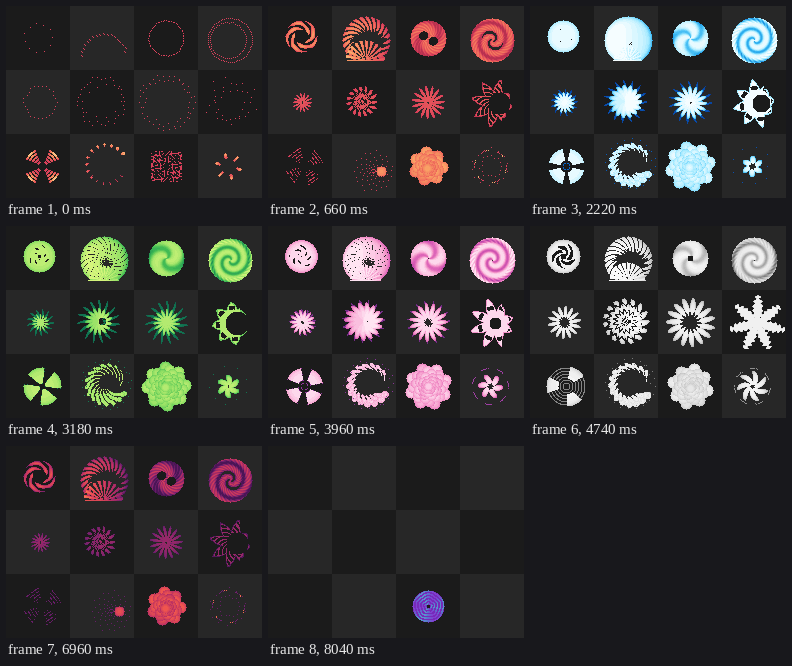
An HTML page with a canvas that plays this animation: 256x192 px, repeating every 8100 ms.

```html
<!DOCTYPE html>
<html lang="en">
<head>
<meta charset="utf-8">
<title>Magic bursts</title>
<style>
html, body { margin: 0; width: 100%; height: 100%; overflow: hidden; background: #1b1b1b; }
canvas { display: block; width: 256px; height: 192px; image-rendering: pixelated; }
</style>
</head>
<body>
<canvas id="stage" width="256" height="192"></canvas>
<script>
const g = document.getElementById('stage').getContext('2d');
const { PI, cos, sin, abs, acos, floor, hypot, atan2, min, max, round } = Math;
const TAU = PI * 2, STEP = 60, LIFE = 15, LEVELS = 24;

// Blend five stops, dark to light, into a smooth ramp
function ramp(stops) {
  const rgb = stops.split(' ').map(s => [1, 3, 5].map(i => parseInt(s.slice(i, i + 2), 16)));
  return Array.from({ length: LEVELS + 1 }, (_, n) => {
    const p = n / LEVELS * 4, i = min(3, floor(p));
    return `rgb(${rgb[i].map((c, j) => round(c + (rgb[i + 1][j] - c) * (p - i)))})`;
  });
}

const palettes = [
  '#a82a4a #d8405a #ee665a #f9a065 #ffe0a4',
  '#7a3018 #c45a20 #f09030 #ffc850 #fff3b0',
  '#08257c #0866c8 #35b5f2 #a5eaff #f5fdff',
  '#0b5048 #148454 #42bb54 #91df64 #d5f57c',
  '#54206c #9438a0 #d85bb4 #f59acb #ffe4f2',
  '#555555 #858585 #b8b8b8 #dddddd #fafafa',
  '#124858 #19808b #35b9a9 #88e2bd #e2ffe0',
  '#38104a #70206d #b92f62 #ef554e #ffc06e',
  '#41167a #7526b5 #8040d0 #5972cd #58aacd'
].map(ramp);

let pal, keep;

const noise = (x, y) => {
  const n = sin(x * 12.9898 + y * 78.233) * 43758.5453;
  return n - floor(n);
};

// Linear value through the main poses of a burst
function at(k, ...v) {
  const t = [0, 4, 7, 8, 11, 14];
  let i = 0;
  while (i < 4 && k > t[i + 1]) i++;
  return v[i] + (v[i + 1] - v[i]) * (k - t[i]) / (t[i + 1] - t[i]);
}

function plot(x, y, v) {
  x = round(x); y = round(y);
  if (v <= 0 || noise(x, y) > keep) return;
  g.fillStyle = pal[round(min(1, v) * LEVELS)];
  g.fillRect(x, y, 1, 1);
}

function field(cx, cy, R, shade) {
  cx = round(cx); cy = round(cy);
  const m = Math.ceil(R);
  for (let y = -m; y <= m; y++)
    for (let x = -m; x <= m; x++) {
      const d = hypot(x, y);
      if (d <= R) plot(cx + x, cy + y, shade(d, atan2(y, x), x, y));
    }
}

const blob = (x, y, r, v) => field(x, y, r, d => max(.05, v - .22 * (d / (r + .1)) ** 3));

function dots(cx, cy, R, n, jitter, v = .25, from = 0, span = TAU) {
  for (let i = 0; i < n; i++) {
    const a = from + span * i / n, r = R + jitter * (noise(i, R) * 2 - 1);
    plot(cx + r * cos(a), cy + r * sin(a), v);
  }
}

function star(cx, cy, { n, hole, inner, outer, twist, turn, light, pow = .5 }) {
  field(cx, cy, outer, (d, a) => {
    const u = .5 + .5 * cos(n * (a - turn) + twist * d / outer);
    const edge = inner + (outer - inner) * u ** pow;
    if (d < hole * (1.25 - .5 * u) || d > edge) return 0;
    return max(.05, light * (1 - .5 * (d / edge) ** 6));
  });
}

// Thin curved spikes behind a flower
function wisps(k, cx, cy, n, outer) {
  if (k > 5 && k < 10)
    star(cx, cy, { n, hole: 5, inner: 5, outer, twist: 4, turn: k * .1, light: .2, pow: 1.2 });
}

const glow = k => at(k, .25, .94, .96, .9, .5, .15);
const dim = k => at(k, .25, .92, .98, .86, .36, .1);

const bursts = [
  k => {
    if (!k) return dots(32, 31, 14, 11, 2);
    const hole = at(k, 13, 3, 0, 2, 7, 14), cut = at(k, .3, -.45, -1.1, -.95, -.25, .9);
    const gap = at(k, 0, .8, .1, .2, .1, 0);
    field(33, 30, at(k, 14, 17, 16, 16, 16, 15), (d, a) => {
      const s = .75 * cos(5 * a + d - k) + .3 * cos(3 * a - d * .5) + gap * cos(d * .42);
      return d < hole || s < cut ? 0 : max(.1, glow(k) + .25 * s * (k > 8) - (d / 17) ** 8 * .4);
    });
  },

  k => {
    if (!k) {
      dots(97, 49, 22, 18, 1, .25, PI, PI);
      dots(98, 50, 22, 18, 1, .25, PI, PI);
      return;
    }
    const light = glow(k), open = at(k, 22, 16, 0, 5, 17, 23);
    const fan = at(k, 2, 18, 14, 15, 20, 6), comb = at(k, .6, -.75, -1.1, -.95, -.55, .6);
    field(98, 34, 24, (d, a, x, y) => {
      const s = cos(24 * a + d * .8);
      const inside = hypot(x - 2, (y - 3) * 1.25) < open + 2.5 * cos(18 * a + d * .4);
      if (y > 20 || inside || s < comb) return 0;
      return max(.1, light + .12 * s * (k > 8) - (d / 25) ** 8 * .45 - x * .007);
    });
    field(97, 54, fan, (d, a, x, y) => {
      if (y > 0) return 0;
      const s = cos(22 * a + d * .1);
      return s < at(k, 0, -.8, -.9, -.7, -.25, .6) ? 0 : light + .12 * s - x * .012;
    });
  },

  k => {
    if (!k) return dots(160, 32, 17.5, 64, .3);
    const turn = k * .55, light = glow(k);
    const hole = at(k, 17, 3, 0, 0, 0, 16), eye = at(k, 0, 0, 0, 0, 4.5, 9);
    field(160, 32, 18, (d, a, x, y) => {
      const side = abs(x * cos(.5) + y * sin(.5)), cross = y * cos(.5) - x * sin(.5);
      if (d < hole || k > 8 && hypot(side - 5.5, cross) < eye) return 0;
      const s = .5 + .5 * cos((k < 8 ? 3 : 2) * (a - turn) + d * .3);
      const braid = k > 8 ? .12 * cos(22 * a + d * 1.5) : 0;
      return max(.08, light - .42 * (1 - s) ** 2 + braid - (d / 19) ** 10 * .3);
    });
  },

  k => {
    if (!k) {
      dots(224, 34, 22, 72, .4);
      dots(222, 34, 18, 54, .5);
      return;
    }
    const turn = k * .5, light = glow(k), hole = at(k, 19, 1, 0, 0, 0, 18);
    field(224, 34, at(k, 21, 23, 23, 22, 22, 20), (d, a) => {
      const s = .5 + .5 * cos(2 * (a - turn) + d * .62);
      if (d < hole || k > 9 && d < 11 && s < at(k, 0, 0, 0, 0, .18, .8)) return 0;
      const rope = .1 * cos(28 * a + d * 1.7) * (k > 8 || d > 18);
      return max(.08, light - .5 * (1 - s) ** 2 + rope - (k < 6 ? .3 * (d / 23) ** 3 : 0));
    });
  },

  k => {
    if (!k) return dots(34, 96, 16, 26, 1.5);
    wisps(k, 34, 96, 13, 14);
    star(34, 96, {
      n: 14, hole: at(k, 14, 5, 0, 0, 1, 8), inner: at(k, 14, 7, 6, 3, 2, 2),
      outer: at(k, 17, 17, 11, 9, 10, 9), twist: 1, turn: k * .09, light: dim(k)
    });
  },

  k => {
    if (!k) {
      dots(95, 95, 23, 36, 3);
      dots(95, 95, 18, 10, 4);
      return;
    }
    const cx = at(k, 95, 95, 95, 92, 93, 93);
    wisps(k, cx, 95, 15, 22);
    const R = at(k, 24, 24, 17, 14, 17, 14), turn = k * .1;
    const base = at(k, .8, .65, .75, .6, .3, .2), hole = at(k, 19, 2, 0, 4, 2, 9);
    field(cx, 95, R, (d, a, x, y) => {
      const u = .5 + .5 * cos(15 * (a - turn) + d * .25);
      const edge = R * (base + (1 - base) * u ** .5);
      if (d > edge || hypot(x - 4, y) < hole) return 0;
      if ((k < 6 || k > 9) && cos(d * .8 + u * 3) < -.65 - .02 * x) return 0;
      return max(.05, dim(k) * (1 - .45 * (d / edge) ** 6 + .1 * cos(a)));
    });
  },

  k => {
    if (!k) {
      dots(160, 96, 27, 30, 2);
      dots(160, 96, 23, 30, 3);
      return;
    }
    wisps(k, 160, 96, 15, 22);
    star(160, 96, {
      n: 15, hole: at(k, 23, 9, 1, 0, 1, 10), inner: at(k, 23, 13, 9, 6, 3, 2),
      outer: at(k, 28, 25, 17, 14, 17, 14), twist: 1.5, turn: k * .08, light: dim(k)
    });
  },

  k => {
    if (!k) {
      dots(224, 96, 22, 25, 6);
      dots(224, 96, 14, 12, 6);
      return;
    }
    const R = at(k, 25, 30, 25, 22, 25, 23), base = at(k, 21, 9, 14, 15, 13, 18);
    const hole = at(k, 20, 0, 9, 12, 11, 21), n = k < 6 ? 7 : 8, turn = k * .11 - .2;
    field(227, 97, R, (d, a, x, y) => {
      const u = 1 - acos(cos(n * (a - turn))) / PI;
      const reach = x > 6 && k > 5 ? .7 : 1;
      const edge = base + (R * reach - base) * u + (k < 6 ? 2.5 * cos(d * 1.4) : 0);
      if (hypot(x - (k > 6 ? 4 : 0), y) < hole || d > edge) return 0;
      const rim = edge - d;
      if (k > 5 && k < 9 && u > .45 && abs(d - 16) < 2 && rim > 2) return 0;
      if (k > 9 && rim > 2.5 && cos(16 * a + d * 1.2) < (x > 2 ? -.1 : .6)) return 0;
      return max(.05, dim(k) - (rim < 1.5 ? .25 : 0));
    });
  },

  k => {
    const n = k > 2 && k < 6 ? 3 : 4, turn = PI / 4 + at(k, 0, .35, 0, .4, .15, .2);
    const cut = at(k, .1, .3, -.65, -.4, .3, .8), core = at(k, 4, 8, 6, 3, 5, 8);
    field(36, 160, at(k, 18, 20, 18, 19, 20, 18), (d, a, x, y) => {
      const s = cos(n * (a - turn)), ring = floor(d) % 3 === 0;
      if (!k) return s < .05 || ring || d < 4 ? 0 : .25 + max(0, d - 8) * .07 * s;
      if (k > 9) return s > -.1 && d > 6 && floor(d + s) % 3 === 0 && noise(x, y) < at(k, 1, 1, 1, 1, .75, .1) ? .22 : 0;
      if (s > cut && d > core) return glow(k) - (d / 20) ** 8 * .35;
      return ring && d > 2 && (k < 6 || s > -.5) ? .25 : 0;
    });
  },

  k => {
    const cx = 100, cy = 158;
    if (k > 9) {
      for (let r = 2; r < 22; r += 3) dots(cx + 5, cy + 7, r, 11, 1, .22, r * .3);
      if (k < 13) blob(113, 165, at(k, 0, 0, 0, 0, 5, 0), .7);
      return;
    }
    const len = at(k, 2, 8, 9, 14, 3, 0), bend = at(k, .01, .06, .06, .06, .05, 0);
    const wide = at(k, 1.5, 3.4, 3.2, 2.2, 1, 0);
    for (let i = 0; i < 15; i++) {
      const a = -.6 - i * .36 - k * .02, size = k ? .45 + i * .045 : 1 - i * .035;
      for (let j = 0; j <= len; j++) {
        const b = a + j * bend, r = 20 - j * (k ? size : 1);
        blob(cx + r * cos(b), cy + r * sin(b), wide * size * (1 - .8 * j / (len + 1)),
          k ? glow(k) : .9 - i * .05 - j * .15);
      }
    }
    if (k > 1 && k < 9) {
      dots(cx, cy, 25, 20, 1, .2, k * .1);
      dots(cx, cy, 22, 14, 2, .2, k * .1);
    }
  },

  k => {
    keep = 1;
    if (!k) {
      field(160, 160, 21, (d, a, x, y) =>
        max(abs(x), abs(y)) < 16 && abs(cos(x * .9 + 3 * sin(y * .43)) + cos(y * .97 + 3 * sin(x * .37))) < .45 ? .26 : 0);
      return;
    }
    if (k > 13) {
      field(160, 160, 16, (d, a) => d < 1.5 ? 0 :
        cos(d * 2.1 + sin(a * 5)) > .1 ? .7 + .2 * cos(a * 3) : .3);
      return;
    }
    // Rings of overlapping puffs, rim first
    const R = at(k, 17, 23, 25, 25, 20, 16), light = at(k, .35, .9, .96, .9, .78, .5);
    const n = k > 9 ? 7 : 8;
    for (let r = R - 6; r > -1; r -= 3)
      for (let i = 0; i < n; i++) {
        const a = i * TAU / n + k * .12 + (R - r) * .09;
        const v = light - .12 * noise(i, round(R - r));
        blob(160 + r * cos(a), 160 + r * sin(a), 6.5 - (R - r) * .08, v);
      }
  },

  k => {
    const cx = 222, cy = 160;
    if (!k || k > 9) {
      const R = at(k, 11, 13, 13, 13, 16, 17);
      for (let i = 0; i < 6; i++) {
        const a = i * TAU / 6 + .25 + k * .09;
        for (let j = -3; j <= 2; j++) {
          const b = a + (k ? j * .09 : 0), r = R + (k ? 0 : j * .7);
          blob(cx + r * cos(b), cy + r * sin(b), k ? .6 : 1, j > 0 ? .8 : k ? .25 : .55);
        }
      }
      if (k) {
        dots(cx, cy, 10, 17, 2, .22);
        dots(cx, cy, 17, 14, 2, .22, .3);
      }
      return;
    }
    star(cx, cy, {
      n: k < 6 ? 7 : 6, hole: at(k, 9, 2, 3, 1, 2, 3), inner: at(k, 7, 3, 5, 5, 3, 2),
      outer: at(k, 13, 16, 11, 12, 14, 14), twist: at(k, 1, 5, 1, 3, 4, 4),
      turn: k * .25, light: glow(k)
    });
    if (k < 7)
      for (let i = 0; i < 7; i++) dots(cx, cy, 18, 7, .4, .3, i * TAU / 7 + k * .25, .45);
    else dots(cx, cy, 17, 9, 3, .15, k);
  }
];

function draw(n) {
  const k = n % LIFE;
  pal = palettes[floor(n / LIFE)];
  for (let i = 0; i < 12; i++) {
    const col = i % 4, row = floor(i / 4);
    g.fillStyle = (col + row) % 2 ? '#272727' : '#1b1b1b';
    g.fillRect(col * 64, row * 64, 64, 64);
  }
  bursts.forEach((burst, i) => {
    keep = k === 1 ? .55 : k === 12 ? .5 : k === 13 ? .12 : 1;
    if (k < 14 || i === 10) burst(k);
  });
}

let last = -1;
const start = performance.now();
function tick() {
  const n = floor(max(0, performance.now() - start) / STEP) % (LIFE * palettes.length);
  if (n !== last) draw(last = n);
  requestAnimationFrame(tick);
}
tick();
</script>
</body>
</html>
```
